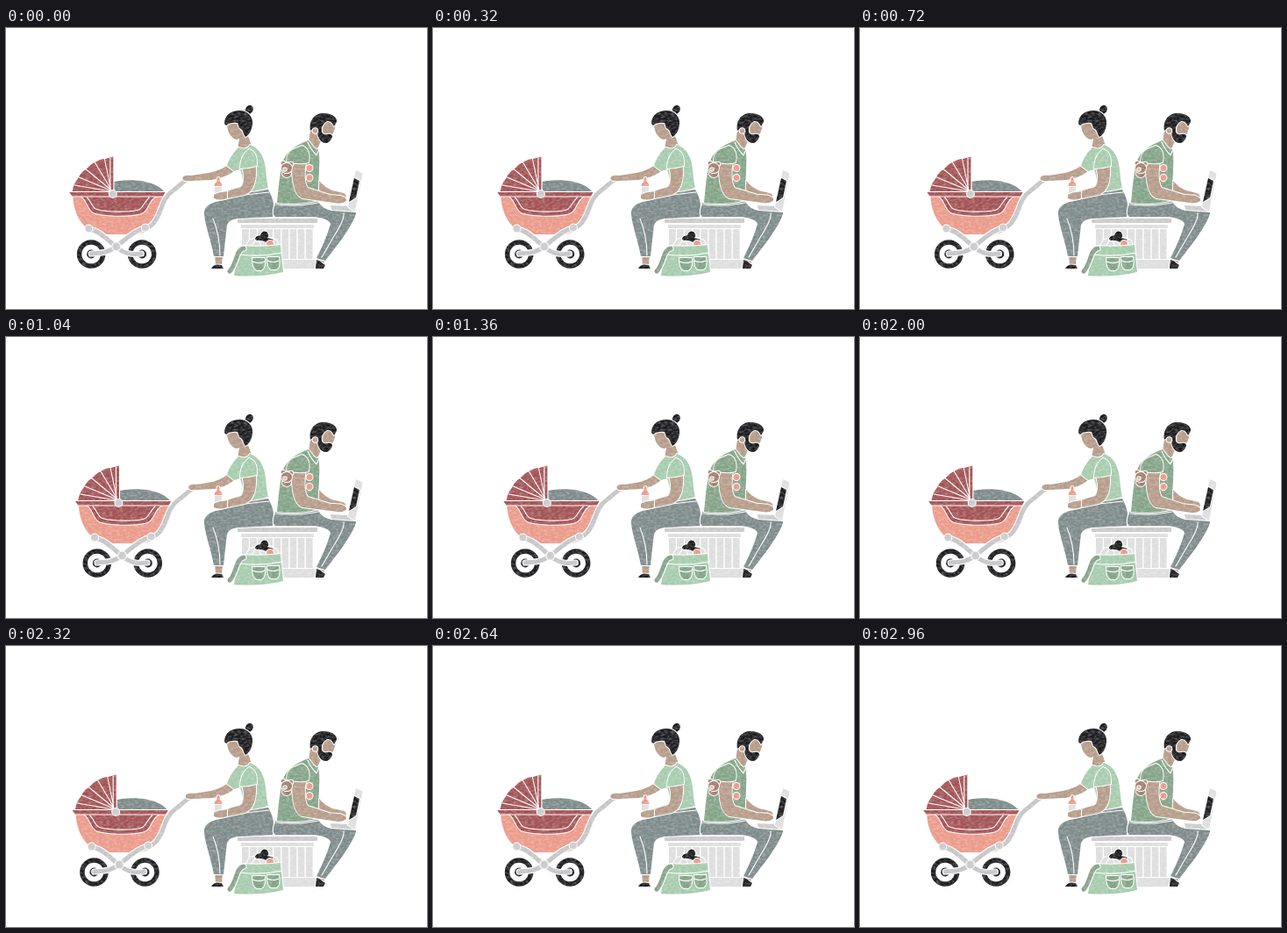
These frames come from a looping animation (480x320 px, 3040 ms). An HTML page:

```html
<!DOCTYPE html>
<html>
<head>
<meta charset="utf-8">
<style>
html, body { margin: 0; width: 100%; height: 100%; overflow: hidden; background: #fff }
svg { display: block; width: 480px; height: 320px }
path, circle, ellipse, rect { paint-order: stroke; stroke: #fff; stroke-width: 2; stroke-linejoin: round; stroke-linecap: round }
.line, .tube, .case { fill: none }
.line { stroke-width: 1.1 }
.case { stroke-width: 7.2 }
.tube { stroke: #c5c5c8; stroke-width: 5 }
.strap { stroke: #87a08e }
.black { fill: #1c1b1e }
.skin { fill: #b69b89 }
.wine { fill: #a25254 }
.pink { fill: #eb9a89 }
.slate { fill: #7d8a89 }
.mint { fill: #a6cbad }
.sage { fill: #83a387 }
.grey { fill: #cbcbcd }
.pale { fill: #dededf }
</style>
</head>
<body>
<svg viewBox="0 0 480 320">
  <defs>
    <filter id="grain" filterUnits="userSpaceOnUse" x="60" y="80" width="360" height="210" color-interpolation-filters="sRGB">
      <feTurbulence type="fractalNoise" baseFrequency=".25 .4" numOctaves="3" seed="4"/>
      <feColorMatrix values="0 0 0 0 1  0 0 0 0 1  0 0 0 0 1  .6 0 0 0 -.22"/>
      <feComposite in2="SourceAlpha" operator="in" result="chalk"/>
      <feMerge><feMergeNode in="SourceGraphic"/><feMergeNode in="chalk"/></feMerge>
    </filter>
    <g id="wheel">
      <circle class="black" r="16.3"/>
      <circle r="9.8" fill="#fff"/>
      <circle class="black" r="5"/>
    </g>
  </defs>

  <g id="bench" filter="url(#grain)">
    <path class="grey" d="M264 217H355V222H264Z"/>
    <path class="pale" d="M268 224H351V228H268Z"/>
    <g id="columns"></g>
    <path class="pale" d="M262 264H353V274H262Z"/>
  </g>

  <g id="pram" filter="url(#grain)">
    <path class="slate" d="M124 188V175C145 171 173 174 182 188Z"/>
    <path class="pink" d="M77 192C78 216 92 235 113 235H148C170 233 183 212 183 191Z"/>
    <path class="wine" d="M87 192C93 196 94 206 100 210C112 215 150 215 157 210C163 206 163 197 171 192Z"/>
    <path class="line" d="M93 193C98 197 98 204 104 206.500C116 210 145 210 153 206.500C158 203 159 197 164 193"/>
    <path class="wine" d="M76 188Q77 178 83 171Q86 164 92 161Q97 155 102 153Q108 149 114 149L123 146.500V188Z"/>
    <path class="line" d="M120 186L79 179M120 185L84 170M120 184L92 161M120 183L102 153M120 182L113 149M119.500 186V148"/>
    <path class="wine" d="M73 187H182L180 191.500H76Z"/>
    <use href="#wheel" x="97.800" y="257.500"/>
    <use href="#wheel" x="155.800" y="257.500"/>
    <g id="frame"></g>
    <circle class="grey" cx="122.500" cy="189" r="4"/>
    <circle class="grey" cx="95" cy="228.500" r="4"/>
    <circle class="grey" cx="159.500" cy="227.500" r="4"/>
    <circle class="grey" cx="126.500" cy="249" r="4.500"/>
  </g>

  <g filter="url(#grain)">
    <!-- woman -->
    <path id="reach" class="skin"/>
    <path class="skin" d="M238 258H247L246 270H239Z"/>
    <path class="black" d="M234 274Q235 271 240 269.500L246 270L248 274Z"/>
    <path class="slate" d="M299 184C305 194 307 206 304 215L264 217C256 218 252 221 251.500 228L248 260H237C234 242 226 222 226 211C226 202 234 199 244 197C258 194 266 190 272 187Z"/>
    <path class="line" d="M244 259C244 241 240 227 236 217M272 190C282 189 291 188 300 187"/>
    <path class="skin" d="M252 106C251 116 256 126 263 127L266 126L264 139Q274 144 280 134L272 112Z"/>
    <path class="mint" d="M265 136C258 143 254 150 252 157L260 163L267 161C270 170 271 178 271 187Q286 186 299 182C296 172 297 160 294 151C291 141 286 136 278 133Q275 140 265 136Z"/>
    <path class="skin" d="M269 159C272 167 272 175 268 181L251 186C244 187 239 189 239 192Q241 196 248 195L272 190C280 187 286 180 285 157Z"/>
    <path class="mint" d="M277 138C270 143 267 151 267 160Q276 160 286 157C286 149 286 141 277 138Z"/>
    <path class="pale" d="M238 180H246L246 194Q242 197 238 194Z"/>
    <path class="pink" d="M237.500 180Q238 176 240.500 175Q240 170 242 170Q244 170 243.500 175Q246 176 246.500 180Z"/>
    <path class="skin" d="M237 190Q241 187 247 187L252 186L252 194Q243 197 237 194Z"/>
    <path class="black" d="M272 98C273 94 273 88 278 88C283 88 283 95 279 97Q277 98 277 101Z"/>
    <path class="black" d="M249 109C249 99 257 94 266 94C276 94 282 101 281 110C280 117 277 122 273 124C270 120 271 116 266 114L264 108Q256 107 251 111Z"/>

    <!-- man -->
    <path class="skin" d="M355 261L364 264L361 270H355Z"/>
    <path class="black" d="M353 274L354 264Q359 265 361 268L364 270L362 274Z"/>
    <path class="slate" d="M308 198C304 207 304 213 307 215H350C362 216 369 219 370 223C366 238 359 252 354 262L364 265C374 252 396 225 399 211Q399 206 390 207L371 208C361 206 357 200 355 196Z"/>
    <path class="line" d="M385 211C386 217 381 226 374 237L360 261M308 201Q332 204 356 199"/>
    <path class="skin" d="M348 110L345 130Q351 142 354 140L359 129C369 128 376 120 376 106L364 102Z"/>
    <path class="sage" d="M345 128C334 132 322 138 317 149C312 163 311 180 309 199Q334 202 357 196C355 183 357 172 357 160Q358 146 356 137Q355 142 345 128Z"/>
    <path class="line" d="M344 130Q348 139 354 145L357 138"/>
    <path class="black" d="M347 117C345 105 352 97 362 97C370 97 378 101 377 107L374 112Q371 105 366 106Q361 109 360 114C359 120 362 122 366 121Q372 120 372 124Q369 132 363 131C357 129 355 123 355 117Q354 113 351 114Z"/>
    <circle class="skin" cx="352.500" cy="117" r="2.800"/>

    <path class="grey" d="M370 202L392 203L399 209L371 207Z"/>
    <path class="pale" d="M399 162L406.500 165.500L398 209L390 204Z"/>
    <path class="black" d="M397 171L403 174L399 193L391 198Z"/>
    <path id="farHand" class="skin" d="M357 174L359 176Q363 181 372 185L385 188Q389 190 387 194L370 192Q361 190 357 186Z"/>
    <path id="nearHand" class="skin" d="M326 152L342 153C340 165 340 176 344 182L369 190L381 191Q389 193 388 197Q383 201 374 199L338 194C327 190 326 171 326 152Z"/>
    <path class="sage" d="M326 139C321 143 320 147 320 152Q334 156 345 153C347 143 344 136 337 134Z"/>
    <g fill="#9d7b69">
      <ellipse cx="320" cy="166" rx="5" ry="4"/>
      <circle cx="316" cy="154" r="2.300"/>
      <circle cx="325" cy="155" r="2.300"/>
      <ellipse cx="320" cy="159.500" rx="6" ry="5.500"/>
    </g>
    <circle cx="318" cy="161" r="1.800" fill="#d9b5a2" stroke="none"/>
    <g class="pink">
      <circle cx="346" cy="159.500" r="3.500"/>
      <circle cx="346" cy="170.500" r="3.500"/>
    </g>

    <!-- bag -->
    <path class="pale" d="M273 249L278 241L286 239L291 244L302 239L309 242L312 251Z"/>
    <path class="black" d="M284 242Q283 237 290 236Q292 230 297 232Q301 236 298 239L305 241L300 245L291 242Z"/>
    <circle class="pink" cx="301" cy="246" r="4"/>
    <path class="line" d="M280 248L285 241M291 249L288 242"/>
    <path class="mint" d="M269 248Q292 250 313 247L316 278Q290 284 260 282C262 270 264 256 269 248Z"/>
    <path class="line" d="M266 258Q290 261 315 256"/>
    <path class="case" d="M271 251C262 252 263 270 255 277"/>
    <path class="tube strap" d="M271 251C262 252 263 270 255 277"/>
    <g class="sage">
      <path d="M281 262H295Q296 274 291 276H286Q281 274 281 262Z"/>
      <path d="M298 261H311Q313 273 308 275H302Q298 273 298 261Z"/>
    </g>
    <path class="line" d="M281 266Q288 269 295 266M298 265Q305 268 311 265"/>
  </g>
</svg>
<script>
const LOOP = 3040, STEP = 80;
const el = id => document.getElementById(id);

el("columns").innerHTML = Array.from({ length: 9 }, (_, i) =>
  `<rect class="pale" x="${269 + i * 9.1}" y="229" width="7.8" height="34"/>`).join("");

const tubes = [
  "M95 229C105 230 112 237 126 249C136 258 145 258 155 257",
  "M209 172C201 175 198 181 190 186C178 194 178 212 169 222Q165 227 159 228C148 230 138 240 126 249C116 257 107 256 98 257"
];
el("frame").innerHTML = tubes.map(d => `<path class="case" d="${d}"/><path class="tube" d="${d}"/>`).join("");

// The wrist follows the pram while the shoulder stays put.
const reach = x => {
  const p = (px, py, follow = 1) => `${px + x * follow} ${py}`;
  return `M257 151C251 159 ${p(244, 162, .3)} ${p(232, 165, .6)}L${p(212, 168)}` +
    `Q${p(203, 167)} ${p(202, 171)}Q${p(202, 175)} ${p(211, 174)}` +
    `L${p(234, 173, .6)}C${p(246, 171, .3)} 256 167 262 161Z`;
};

function draw(now) {
  const t = Math.floor(now % LOOP / STEP) * STEP;
  const x = 4.1 * (1 - Math.cos(2 * Math.PI * (t + 50) / LOOP)) - .7;
  const tap = Math.sin(2 * Math.PI * t / 380);
  el("pram").setAttribute("transform", `translate(${x} 0)`);
  el("reach").setAttribute("d", reach(x));
  el("nearHand").setAttribute("transform", `rotate(${tap * .6} 334 186)`);
  el("farHand").setAttribute("transform", `rotate(${-tap * .8} 360 172)`);
  requestAnimationFrame(draw);
}
draw(0);
</script>
</body>
</html>
```
